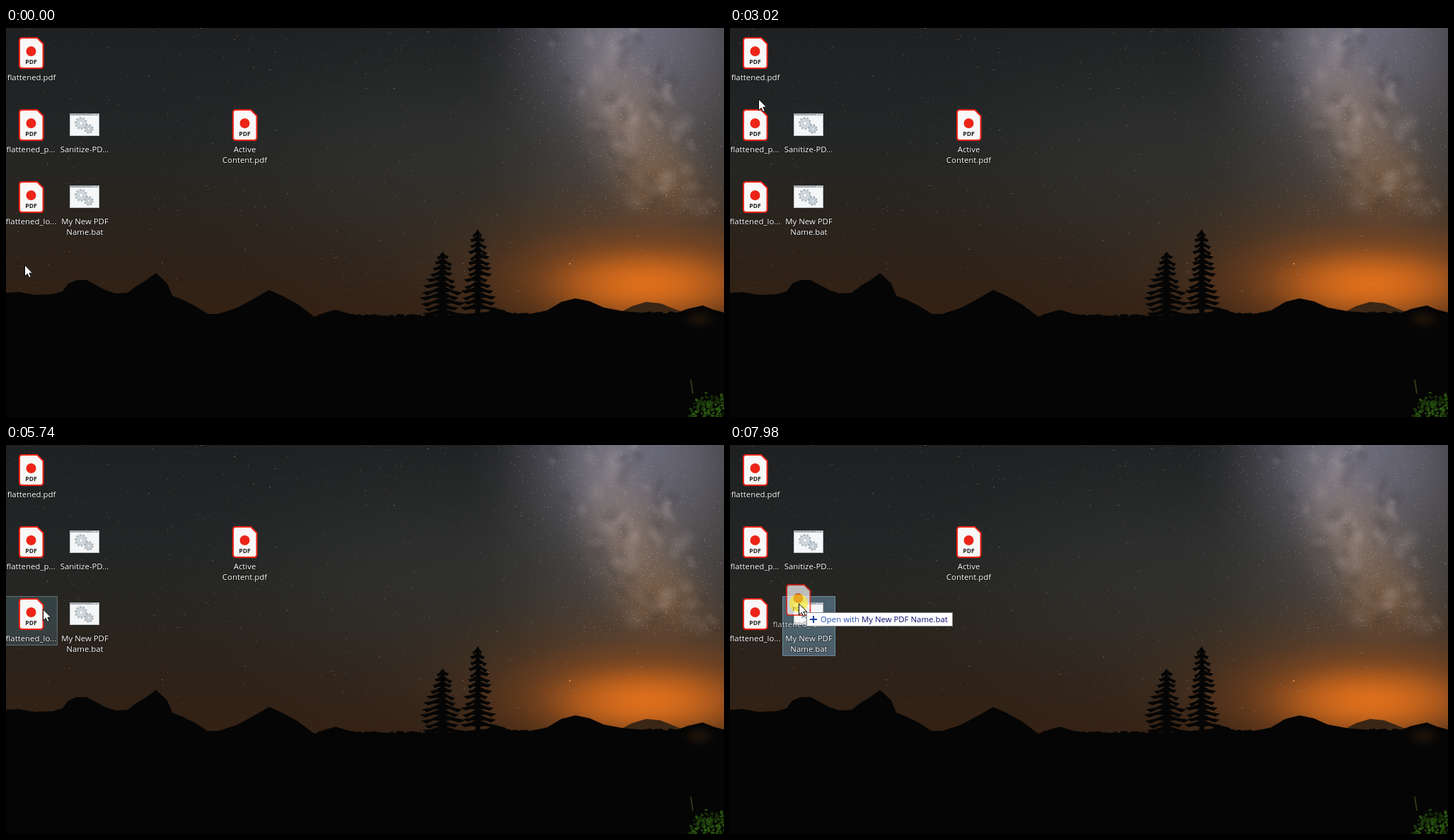
An HTML page with a canvas for the animation above (8000 ms loop, 1015 px wide and 551 px high).

```html
<!DOCTYPE html>
<html lang="en">
<head>
<meta charset="utf-8">
<title>Desktop drag and drop</title>
<style>
  html, body { margin: 0; width: 100%; height: 100%; overflow: hidden; background: #050505; }
  canvas, svg { position: absolute; left: 0; top: 0; display: block; }
  text { font: 11.4px "Open Sans", "Noto Sans", sans-serif; }
  .label { fill: #fff; text-anchor: middle; paint-order: stroke; stroke: rgba(0,0,0,.4); stroke-width: 2px; stroke-linejoin: round; }
  .pdf { font-size: 8.6px; font-weight: 700; text-anchor: middle; fill: #222; }
  .hover { fill: rgba(105,165,190,.22); stroke: rgba(165,195,205,.42); }
  .drop { fill: rgba(125,180,215,.42); stroke: rgba(140,190,220,.6); }
</style>
</head>
<body>
<canvas id="sky" width="1015" height="551"></canvas>
<svg width="1015" height="551" viewBox="0 0 1015 551">
  <defs>
    <g id="page">
      <path d="M5 1H26L34.500 9.500V40Q34.500 44 30.500 44H5Q1 44 1 40V5Q1 1 5 1Z" fill="#f8f8f8" stroke="#ec2418" stroke-width="2"/>
      <circle cx="17.500" cy="20" r="7" fill="#ec2418"/>
      <text class="pdf" x="17.500" y="38">PDF</text>
    </g>
    <g id="script">
      <rect x=".5" y=".5" width="41" height="31" fill="#f5f6f7" stroke="#b9bec2"/>
      <rect width="42" height="3" fill="#a5acb1"/>
      <path d="M32 1.500h2M35.500 1.500h2M39 1.500h2" stroke="#eef0f1"/>
      <g fill="none">
        <circle cx="16" cy="14" r="7.800" stroke="#a9b4bb" stroke-width="2.400" stroke-dasharray="2.450"/>
        <circle cx="16" cy="14" r="5" stroke="#cfd8dd" stroke-width="4"/>
        <circle cx="16" cy="14" r="6.900" stroke="#a9b4bb" stroke-width=".7"/>
        <circle cx="16" cy="14" r="2.800" stroke="#a9b4bb" stroke-width=".7"/>
        <circle cx="27" cy="22" r="5.700" stroke="#9faab2" stroke-width="2" stroke-dasharray="2.240"/>
        <circle cx="27" cy="22" r="3.500" stroke="#c8d2d8" stroke-width="3"/>
        <circle cx="27" cy="22" r="4.900" stroke="#9faab2" stroke-width=".7"/>
        <circle cx="27" cy="22" r="1.900" stroke="#9faab2" stroke-width=".7"/>
      </g>
    </g>
  </defs>

  <rect class="hover" x="-1.5" y="10.5" width="74" height="69"/>
  <rect class="hover" x="-1.5" y="112.5" width="74" height="69"/>
  <rect class="hover" x="-1.5" y="214.5" width="74" height="69"/>
  <rect id="drop" class="drop" x="74.5" y="214.5" width="74" height="84"/>

  <use href="#page" x="18" y="13"/>
  <use href="#page" x="18" y="115"/>
  <use href="#page" x="18" y="217"/>
  <use href="#page" x="320" y="115"/>
  <use href="#script" x="90" y="121"/>
  <use href="#script" x="90" y="223"/>

  <text class="label" x="36" y="74">flattened.pdf</text>
  <text class="label" x="35" y="176">flattened_p...</text>
  <text class="label" x="35.5" y="278">flattened_lo...</text>
  <text class="label" x="111" y="176">Sanitize-PD...</text>
  <text class="label" x="111.5" y="278">My New PDF</text>
  <text class="label" x="111.5" y="293">Name.bat</text>
  <text class="label" x="337.5" y="176">Active</text>
  <text class="label" x="337.5" y="191">Content.pdf</text>

  <g id="ghost" opacity=".72">
    <use href="#page" x="18" y="217"/>
    <text class="label" x="35.5" y="278">flattened_lo...</text>
  </g>

  <g id="pointer">
    <circle id="press" r="13" fill="#ffee1e" fill-opacity=".62"/>
    <g id="tip">
      <rect x="11.5" y="13.5" width="206" height="19" fill="#fff" stroke="#8a8a8a"/>
      <path d="M16 23h10M21 18v10" stroke="#1c3f9c" stroke-width="2"/>
      <text x="31" y="27" fill="#2a52b0">Open with <tspan fill="#0a0a6e">My New PDF Name.bat</tspan></text>
    </g>
    <path d="M.5 .8V16.800L4.200 13.300L6.700 18.600L9.300 17.500L6.900 12.200H11.700Z" fill="#fff" stroke="#000" stroke-linejoin="round"/>
  </g>
</svg>

<script>
const W = 1015, H = 551, LOOP = 8000, INK = '#050505';
const c = document.getElementById('sky').getContext('2d');

let seed = 11;
const rnd = (a = 0, b = 1) => {
  seed = (seed * 16807) % 2147483647;
  return a + (b - a) * seed / 2147483647;
};

function glow(x, y, rx, ry, rgb, alpha, turn = 0) {
  c.save();
  c.translate(x, y);
  c.rotate(turn);
  c.scale(rx, ry);
  const g = c.createRadialGradient(0, 0, 0, 0, 0, 1);
  for (let i = 0; i <= 6; i++) {
    const k = i / 6;
    g.addColorStop(k, `rgba(${rgb},${alpha * (1 - k * k * (3 - 2 * k))})`);
  }
  c.fillStyle = g;
  c.fillRect(-1, -1, 2, 2);
  c.restore();
}

function shape(points, fill) {
  c.fillStyle = fill;
  c.beginPath();
  points.forEach(p => c.lineTo(p[0], p[1]));
  c.fill();
}

// Centre line of the bright band in the sky
const bandX = y => 835 + y * .42;

function sky() {
  const g = c.createLinearGradient(0, 0, 0, 410);
  [[0, '#1e2022'], [.35, '#232626'], [.6, '#28251f'], [.8, '#2e2219'], [1, '#342113']]
    .forEach(s => g.addColorStop(...s));
  c.fillStyle = g;
  c.fillRect(0, 0, W, H);
  glow(620, 200, 420, 260, '70,68,64', .3);
  glow(920, 140, 290, 330, '94,86,84', .75);
  glow(890, -10, 240, 220, '122,122,142', .75);
  glow(850, 60, 80, 150, '150,142,148', .4, -.25);
  glow(890, 150, 95, 140, '160,128,104', .45, -.35);
  glow(930, 220, 90, 80, '146,104,64', .4);
  for (let i = 0; i < 70; i++) {
    const y = rnd(-10, 260);
    const tone = rnd() < .6 ? '190,176,172' : '40,36,38';
    glow(bandX(y) + rnd(-75, 75), y, rnd(8, 26), rnd(8, 22), tone, .16, rnd(0, 3));
  }
  glow(910, 335, 420, 160, '112,66,32', .6);
  glow(905, 362, 285, 105, '176,88,26', .75);
  glow(905, 363, 175, 62, '228,114,28', .9);
}

function stars() {
  for (let i = 0; i < 900; i++) {
    const x = rnd(0, W), y = 385 * rnd() ** 1.2;
    c.fillStyle = rnd() < .3 ? `rgba(190,130,75,${rnd(.15, .6)})` : `rgba(190,190,188,${rnd(.1, .42)})`;
    c.fillRect(x | 0, y | 0, rnd() < .12 ? 2 : 1, 1);
  }
  for (let i = 0; i < 1300; i++) {
    const y = rnd(0, 270), x = bandX(y) + (rnd() + rnd() - 1) * 170;
    c.fillStyle = `rgba(215,205,205,${rnd(.1, .45)})`;
    c.fillRect(x | 0, y | 0, 1, 1);
  }
  c.fillStyle = '#e08a3c';
  c.fillRect(796, 333, 2, 2);
}

function tree(x, top, base, spread) {
  shape([[x, top], [x + 4, base + 12], [x - 4, base + 12]], INK);
  for (let y = top + 6; y < base; y += 8) {
    const k = (y - top) / (base - top);
    for (const side of [-1, 1]) {
      const len = spread * (.2 + .8 * k ** .7) * rnd(.65, 1.08), dip = rnd(0, 4);
      shape([[x, y - 6], [x + side * len * .55, y - 1 + dip / 2], [x + side * len, y + dip],
             [x + side * len * .75, y + 4 + dip], [x + side * len * .4, y + 3], [x, y + 4]], INK);
    }
  }
}

function land() {
  shape([[862, 406], [885, 394], [905, 388], [925, 390], [945, 398], [970, 408]], '#3a2614');
  shape([[0, 551], [0, 375], [18, 374], [40, 378], [66, 377], [80, 373], [88, 362], [100, 357], [114, 357],
    [125, 363], [140, 371], [155, 376], [172, 375], [185, 365], [197, 358], [212, 347], [221, 355], [228, 362],
    [235, 379], [250, 385], [268, 394], [285, 405], [300, 405], [325, 397], [346, 386], [372, 371], [390, 379],
    [412, 391], [436, 409], [452, 403], [466, 399], [486, 405], [515, 409], [575, 411], [640, 406], [680, 402],
    [692, 397], [705, 400], [715, 408], [742, 405], [765, 400], [785, 388], [805, 383], [825, 387], [845, 396],
    [872, 401], [908, 404], [945, 405], [963, 398], [985, 393], [1000, 399], [1015, 403], [1015, 551]], INK);
  for (let x = 445; x < W; x += 5) {
    const y = x < 700 ? 409 : x < 780 ? 406 : 405;
    c.beginPath();
    c.ellipse(x, y, rnd(2, 5), rnd(1, 4), 0, 0, 7);
    c.fill();
  }
  glow(980, 412, 28, 18, '70,42,18', .35);
  tree(617, 317, 412, 38);
  tree(667, 285, 400, 28);
}

function shrub() {
  c.strokeStyle = '#34331c';
  c.lineWidth = 2;
  c.beginPath();
  c.moveTo(968, 498);
  c.lineTo(971, 518);
  c.stroke();
  for (let i = 0; i < 230; i++) {
    const x = rnd(956, 1016), y = rnd(513, 552);
    if (Math.hypot((x - 997) / 34, (y - 545) / 31) > rnd(.6, 1.05)) continue;
    const lit = rnd(.35, 1);
    c.fillStyle = `rgb(${48 * lit},${98 * lit},${18 * lit})`;
    c.beginPath();
    c.ellipse(x, y, rnd(1, 3.2), rnd(1, 2.4), rnd(0, 3), 0, 7);
    c.fill();
  }
}

sky();
stars();
land();
shrub();

const ease = {
  line: k => k,
  slow: k => k ** 1.5,
  brake: k => 1 - (1 - k) ** 1.8,
  both: k => k * k * (3 - 2 * k)
};
// Pointer moves: first step, last step, step count, end x, end y, easing
const start = [26, 335];
const moves = [
  [1480, 2260, 11, 35, 267, 'both'],
  [2330, 2560, 4, 41, 246, 'brake'],
  [2790, 3020, 4, 40, 100, 'slow'],
  [3100, 3570, 7, 42, 35, 'brake'],
  [3800, 4030, 4, 43, 92, 'slow'],
  [4110, 4580, 7, 41, 136, 'brake'],
  [4650, 4730, 2, 41, 141, 'line'],
  [4880, 4880, 1, 41, 142, 'line'],
  [5200, 5740, 8, 52, 232, 'both'],
  [6210, 6670, 7, 36, 244, 'both'],
  [6980, 7210, 4, 45, 232, 'line'],
  [7290, 7750, 7, 92, 221, 'brake'],
  [7830, 7980, 3, 97, 224, 'line']
];
const PRESS = 6750, DRAG = 6980;

function pointerAt(t) {
  let [x, y] = start;
  for (const [a, b, n, ex, ey, kind] of moves) {
    if (t < a) break;
    const gap = n > 1 ? (b - a) / (n - 1) : 1;
    const done = Math.min(n, Math.floor((t - a) / gap + .2) + 1);
    const k = ease[kind](done / n);
    x += (ex - x) * k;
    y += (ey - y) * k;
    if (done < n) break;
  }
  return [Math.round(x), Math.round(y)];
}

const el = id => document.getElementById(id);
const [ghost, pointer, press, tip, drop] = ['ghost', 'pointer', 'press', 'tip', 'drop'].map(el);
const hovers = [...document.querySelectorAll('.hover')];
const tops = [10, 112, 214];
const show = (node, on) => node.setAttribute('visibility', on ? 'visible' : 'hidden');

function draw(t) {
  const [x, y] = pointerAt(t), drag = t >= DRAG, over = drag && x >= 74;
  pointer.setAttribute('transform', `translate(${x} ${y})`);
  ghost.setAttribute('transform', `translate(${x - 36} ${y - 244})`);
  hovers.forEach((h, i) => show(h, !drag && x < 73 && y >= tops[i] && y < tops[i] + 70));
  show(ghost, drag);
  show(press, t >= PRESS);
  show(drop, over);
  show(tip, over);
}

const t0 = performance.now();
function tick() {
  draw((performance.now() - t0) % LOOP);
  requestAnimationFrame(tick);
}
tick();
</script>
</body>
</html>
```
